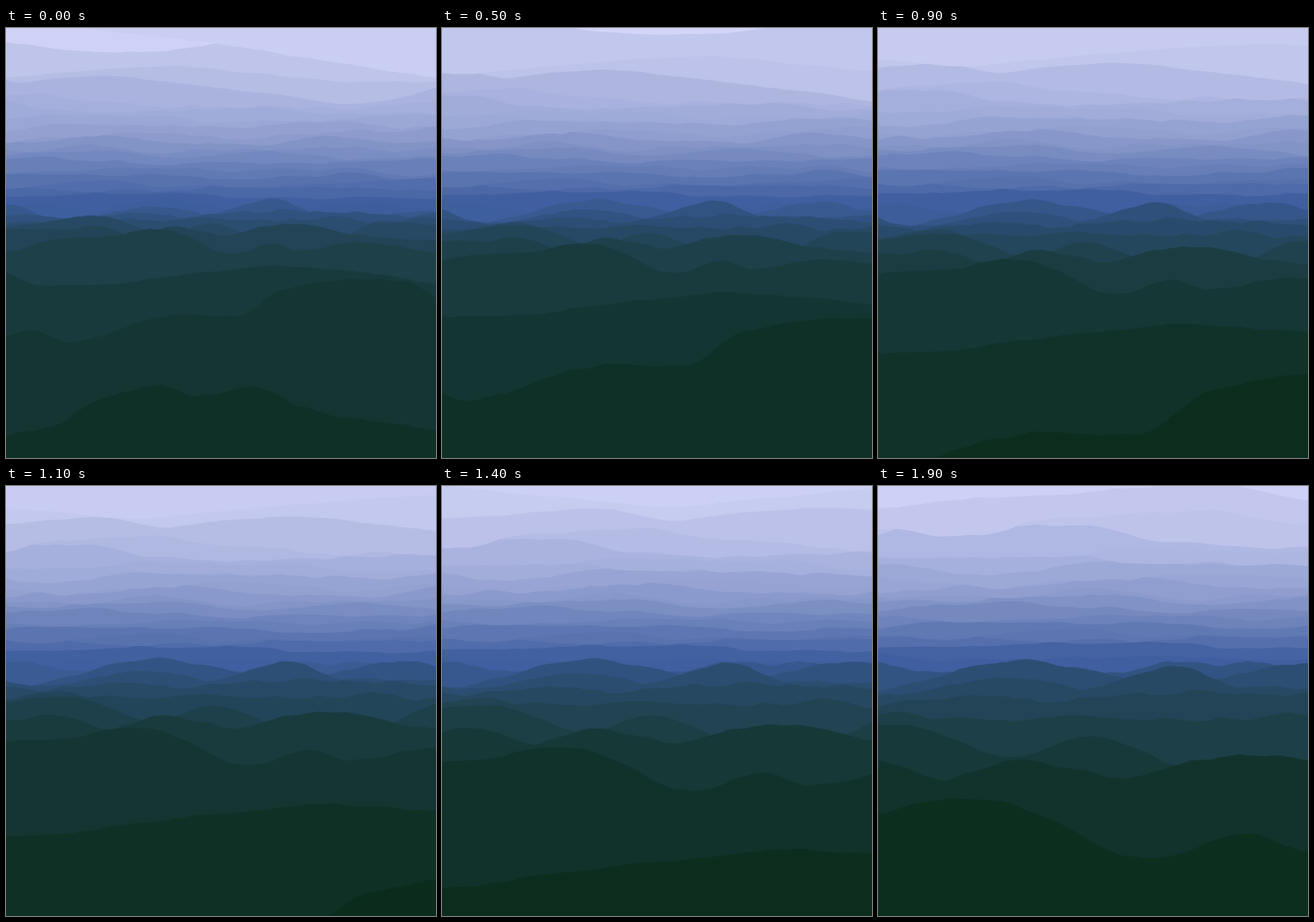
Write an HTML page that moves like this. It is 500 px wide and 500 px high and loops after 2 s.

```html
<!DOCTYPE html>
<html lang="en">
<head>
<meta charset="utf-8">
<title>Mountain flight</title>
<style>
  html, body { margin: 0; width: 100%; height: 100%; overflow: hidden; background: #405fa0; }
  svg { display: block; width: 100%; height: 100%; }
</style>
</head>
<body>
<svg id="scene" viewBox="0 0 500 500" preserveAspectRatio="none"></svg>
<script>
const SIZE = 500, LOOP = 2000, STEP = 100;
const svg = document.getElementById('scene');

// Colour stops: land by distance, sky by height on the screen
const LAND = [[1.2, 11, 44, 28], [3.3, 30, 64, 74], [6, 50, 84, 132], [7.2, 62, 95, 158]];
const SKY = [[0, 210, 212, 248], [60, 188, 194, 233], [125, 146, 160, 208], [205, 64, 95, 160]];

function shade(stops, v) {
  let i = 1;
  while (i < stops.length - 1 && v > stops[i][0]) i++;
  const a = stops[i - 1], b = stops[i];
  const k = Math.min(1, Math.max(0, (v - a[0]) / (b[0] - a[0])));
  return `rgb(${[1, 2, 3].map(c => Math.round(a[c] + (b[c] - a[c]) * k))})`;
}

// Seeded value noise in four octaves, about -1 to 1
function hash(n, seed) {
  const v = Math.sin(n * 127.1 + seed * 311.7) * 43758.5453;
  return v - Math.floor(v);
}

function noise(x, seed) {
  let sum = 0;
  for (let o = 0, amp = 1; o < 4; o++, amp *= 0.45, x *= 2.1) {
    const n = Math.floor(x), u = x - n, k = u * u * (3 - 2 * u);
    const a = hash(n, seed + o), b = hash(n + 1, seed + o);
    sum += amp * (2 * (a + (b - a) * k) - 1);
  }
  return sum;
}

// Smooth curve through "x,y x,y ..." key points, flat beyond both ends
function curve(text) {
  const p = text.split(' ').map(s => s.split(',').map(Number));
  const last = p.length - 1;
  const slope = p.map((_, i) => {
    const a = p[Math.max(0, i - 1)], b = p[Math.min(last, i + 1)];
    return (b[1] - a[1]) / (b[0] - a[0]);
  });
  return x => {
    if (x <= p[0][0]) return p[0][1];
    if (x >= p[last][0]) return p[last][1];
    let i = 1;
    while (x > p[i][0]) i++;
    const [x0, y0] = p[i - 1], [x1, y1] = p[i];
    const w = x1 - x0, u = (x - x0) / w, v = 1 - u;
    return y0 * v * v * (1 + 2 * u) + y1 * u * u * (3 - 2 * u)
      + w * u * v * (slope[i - 1] * v - slope[i] * u);
  };
}

const layers = [];

// far: seconds until the layer passes the camera; at: time at which edge holds;
// (cx, cy): point it grows from; land fills down from the edge, sky fills up
function addLayer(layer) {
  layer.path = document.createElementNS('http://www.w3.org/2000/svg', 'path');
  svg.append(layer.path);
  layers.push(layer);
}

function addCloud(far, cy, edge) {
  addLayer({ far, cy, edge, at: 0, cx: -270, land: false });
}

// Distant cloud bands, evenly stacked
for (let i = 16; i >= 0; i--) {
  const level = 85 + 8 * i, amp = 8 - 0.25 * i;
  addCloud(3.6 + 0.4 * i, level + 35, x => level + amp * noise(x / 95, i * 7));
}

// Front clouds, nearest first
const fronts = [
  '-100,-60 60,-8 240,18 350,35 500,58',
  '-80,5 100,27 230,20 400,-20',
  '-240,34 -127,52 -24,60 61,52 194,44 273,51 400,63',
  '-200,70 -32,56 20,64 60,58 130,57 310,77 415,88 500,70'
].map(curve);
for (let i = fronts.length - 1; i >= 0; i--) {
  addCloud(1.5 + 0.5 * i, 90, x => fronts[i](x) + noise(x / 30, i));
}

// Ridges, nearest first; a single point is a plain level for noise
const ridges = [
  '0,476 60,460 100,434 175,415 220,428 295,420 345,443 500,468',
  '0,357 30,352 75,365 190,336 270,333 325,304 465,294 500,313',
  '0,287 40,299 165,292 350,278 500,297',
  '-280,424 -190,395 0,380 85,363 180,378 275,425 330,431 430,402 500,424 670,402 912,433',
  '-75,325 0,319 80,340 170,319 290,339 370,319 470,314 577,336 804,354',
  '-250,310 35,279 155,316 255,291 350,325 504,322 587,292 800,305',
  '0,270',
  '0,247',
  '-82,219 0,242 165,222 240,236 343,211 420,233 650,228',
  '0,240 165,204 300,224 400,224 490,206 560,218',
  '0,211'
];
for (let i = ridges.length - 1; i >= 0; i--) {
  const far = 1.65 + 0.5 * i + 0.012 * i * i;
  const line = curve(ridges[i]);
  const [size, amp] = ridges[i].includes(' ') ? [35, 2.2] : [70, 7];
  addLayer({
    far, cx: 225, cy: 141 + 22 * Math.max(0, far - 5),
    at: i < 3 ? 0 : 1.9, land: true,
    edge: x => line(x) + amp * noise(x / size, i * 5)
  });
}

function drawLayer({ far, at, cx, cy, edge, land, path }, t) {
  const z = far - t;
  if (z < 0.08) {
    path.setAttribute('d', '');
    return;
  }
  const scale = (far - at) / z, limit = land ? 510 : -10;
  let d = `M-4 ${limit}`, sum = 0, count = 0;
  for (let x = -4; x <= SIZE + 4; x += 4) {
    const y = cy + (edge(cx + (x - cx) / scale) - cy) * scale;
    d += `L${x} ${Math.max(-10, Math.min(510, y)).toFixed(1)}`;
    sum += y;
    count++;
  }
  path.setAttribute('d', `${d}L${SIZE + 4} ${limit}Z`);
  path.setAttribute('fill', land ? shade(LAND, z) : shade(SKY, sum / count));
}

const start = performance.now();
let shown = -1;
function tick() {
  const ms = Math.max(0, performance.now() - start) % LOOP;
  const step = Math.floor(ms / STEP);
  if (step !== shown) {
    shown = step;
    layers.forEach(layer => drawLayer(layer, step * STEP / 1000));
  }
  requestAnimationFrame(tick);
}
tick();
</script>
</body>
</html>
```
